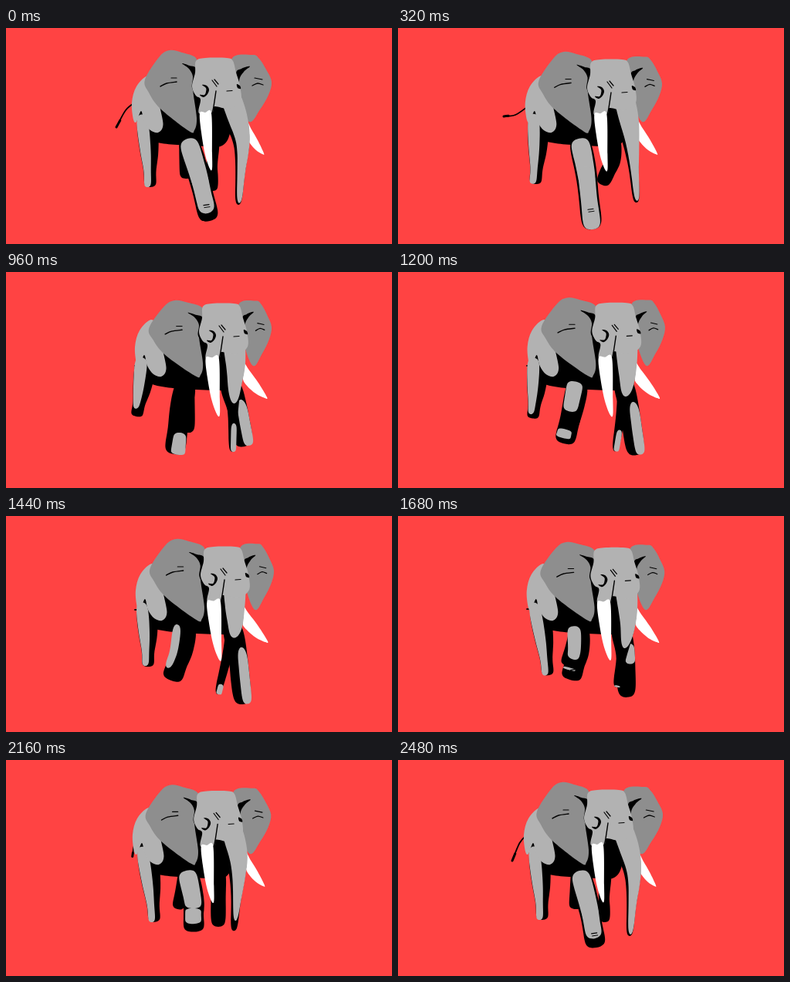
Write an HTML page with a canvas that moves like this. It is 500 px wide and 281 px high and loops after 2.56 s.

```html
<!DOCTYPE html>
<html lang="en">
<head>
<meta charset="utf-8">
<title>Walking elephant</title>
<style>
html, body { margin: 0; width: 100%; height: 100%; overflow: hidden; background: #ff4343; }
canvas { display: block; width: 500px; height: 281px; }
</style>
</head>
<body>
<canvas id="stage" width="500" height="281"></canvas>
<script>
const ctx = document.getElementById('stage').getContext('2d');
const LOOP = 2560, STEP = 80;
const TIMES = [0, 320, 640, 960, 1440, 1840, 2480];
const RED = '#ff4343', LIGHT = '#b2b2b2', EAR = '#8e8e8e', BLACK = '#000', WHITE = '#fff';

const nums = s => s.split(' ').map(Number);
const track = s => s.split(', ').map(nums);
const mix = (a, b, u) => a + (b - a) * u;

// One row per pose.
const HEAD = track('0 0 29 344, 4 2 31 342, 7 4 36 341, 9 2 37 344, 11 1 30 347, 6 3 36 344, 0 0 29 343'); // shift, left ear top, right ear edge
const TRUNK = track('307 302 230 3.9 4, 304 310 227 3.9 4, 298 307 230 3.9 4, 296 294 234 2.5 3.1, 296 275 232 2.2 3.6, 298 290 218 2.95 4, 306 301 229 3.9 4'); // bend, tip, light ranges
const NEAR = track('249 190 264 251, 243 185 252 262, 232 185 232 249, 226 180 218 237, 228 175 214 214, 238 175 232 213, 247 190 257 244'); // knee, foot
const NEAR_LIGHT = track('1.6 .9 2.6 0, 1.6 .9 3 0, 1.35 1.4 3 0, .1 2 3 .3, 2.3 2.3 2.3 -.75, 1.3 2.1 2.4 -.15, 1.6 .9 2.5 0');
const FAR = track('267 175 268 212 .55, 279 170 264 204 .75, 293 170 290 214 1.05, 299 175 309 227 1, 300 180 307 245 .95, 288 172 288 228 .95, 267 175 268 211 .55'); // knee, foot, girth
const FAR_LIGHT = track('.8, .8, 2.5, 3, 3, .8, .8');
const HIND = track('187 207 3, 178 203 3, 171 197 3, 169 188 2.3, 184 196 2.9, 198 212 3, 187 208 3'); // foot, light end
const BACK = track('233 196, 241 196, 234 205, 237 209, 216 196, 218 194, 229 194');
const TAIL = track('97 143 129 -6, 103 137 115 4, 130 154 139 2, 122 172 122 0, 122 172 122 0, 120 172 120 0, 97 148 131 -6'); // base y, tip, sag

// Periodic monotone cubic interpolation.
function at(keys, t) {
  const n = TIMES.length, wrap = k => (k + n) % n;
  let i = n - 1;
  while (TIMES[i] > t) i--;
  const span = k => (TIMES[wrap(k + 1)] - TIMES[wrap(k)] + LOOP) % LOOP;
  const h = span(i), u = (t - TIMES[i]) / h;
  return keys[i].map((a, j) => {
    const rate = k => (keys[wrap(k + 1)][j] - keys[wrap(k)][j]) / span(k);
    const slope = k => {
      const p = rate(k - 1), q = rate(k);
      return p * q > 0 ? 2 * p * q / (p + q) : 0;
    };
    return mix(a, keys[wrap(i + 1)][j], u * u * (3 - 2 * u))
      + h * u * (1 - u) * ((1 - u) * slope(i) - u * slope(i + 1));
  });
}

// Smooth curve through a flat list of x, y.
function trace(p, closed) {
  const n = p.length / 2;
  const pt = k => {
    k = closed ? (k + n) % n : Math.max(0, Math.min(n - 1, k));
    return [p[2 * k], p[2 * k + 1]];
  };
  ctx.beginPath();
  ctx.moveTo(p[0], p[1]);
  for (let k = 0; k < (closed ? n : n - 1); k++) {
    const [a, b, c, d] = [pt(k - 1), pt(k), pt(k + 1), pt(k + 2)];
    ctx.bezierCurveTo(b[0] + (c[0] - a[0]) / 6, b[1] + (c[1] - a[1]) / 6,
      c[0] - (d[0] - b[0]) / 6, c[1] - (d[1] - b[1]) / 6, c[0], c[1]);
  }
}

function fill(p, color) {
  trace(p, true);
  ctx.fillStyle = color;
  ctx.fill();
}

function line(p, width) {
  trace(p, false);
  ctx.lineWidth = width;
  ctx.stroke();
}

// Draws shapes and lines made for box a stretched into box b.
function fit(a, b, shapes) {
  const sx = (b[2] - b[0]) / (a[2] - a[0]), sy = (b[3] - b[1]) / (a[3] - a[1]);
  ctx.save();
  ctx.transform(sx, 0, 0, sy, b[0] - a[0] * sx, b[1] - a[1] * sy);
  for (const [p, style] of shapes) (typeof style === 'number' ? line : fill)(p, style);
  ctx.restore();
}

const shapes = (...list) => list.map(([s, style]) => [nums(s), style]);

// Point and half width along a chain of [x, y, w] joints.
function along(chain, u) {
  const last = chain.length - 1;
  const i = Math.min(Math.floor(u), last - 1), f = u - i;
  const [a, b, c, d] = [i - 1, i, i + 1, i + 2].map(k => chain[Math.max(0, Math.min(last, k))]);
  return b.map((v, k) => v + f / 2 * (c[k] - a[k]
    + f * (2 * a[k] - 5 * v + 4 * c[k] - d[k] + f * (3 * (v - c[k]) + d[k] - a[k]))));
}

// Rounded limb over part of a chain; shift moves it sideways by its own width.
function limb(chain, color, from = 0, to = chain.length - 1, shift = 0, scale = 1) {
  if (to - from < .05) return;
  const N = 14, left = [], right = [];
  for (let k = 0; k <= N; k++) {
    const v = (1 - Math.cos(Math.PI * k / N)) / 2, u = mix(from, to, v);
    const [x, y, w] = along(chain, u);
    const a = along(chain, Math.max(0, u - .05));
    const b = along(chain, Math.min(chain.length - 1, u + .05));
    const dx = b[0] - a[0], dy = b[1] - a[1], len = Math.hypot(dx, dy) || 1;
    const girth = w * scale * Math.sqrt(1 - (2 * v - 1) ** 6);
    const side = r => [x + dy / len * r, y - dx / len * r];
    right.push(side(w * shift + girth));
    left.unshift(side(w * shift - girth));
  }
  fill([...right, ...left.slice(1, -1)].flat(), color);
}

// Hip, knee, ankle, foot.
function leg(hip, knee, foot, widths, bend = .5) {
  const ankle = [mix(knee[0], foot[0], bend), mix(knee[1], foot[1], bend)];
  return [hip, knee, ankle, foot].map((p, i) => [p[0], p[1], widths[i]]);
}

const BODY = shapes(['185 68 171 95 169 118 178 142 196 150 222 153 262 155 280 154 290 138 292 100 270 60', BLACK]);
const RUMP = shapes(['184 62 169 76 163 97 165 119 169 122 175 108 179 122 187 133 197 136 203 129 202 115 192 75', LIGHT]);
const LEFT_EAR = shapes(
  ['180 67 199 37 212 29 228 32 246 39 248 56 242 76 247 117 244 133 237 134 200 105 185 84', EAR],
  ['228 46 238 49 247 54 247 80 249 91 241 78 242 63 237 53', BLACK],
  ['200 76 208 72 221 70', 1.4], ['214 65 221 65', 1.1]);
const RIGHT_EAR = shapes(
  ['292 41 319 35 328 40 337 54 344 70 340 87 329 106 315 122 300 90', EAR],
  ['316 50 305 53 298 60 304 94 302 69 308 57', BLACK],
  ['319 75 326 72 333 74', 1.3], ['322 65 332 67', 1.2]);
const FACE = shapes(
  ['246 43 258 39 286 39 294 43 298 58 303 75 304 95 290 105 270 102 267 110 250 111 252 93 246 88 241 76 245 58', LIGHT],
  ['254 74 260 75 263 80 261 86 256 90 251 87 257 87 259 83 259 78', BLACK],
  ['272 82 269 102 267 111', 1.4], ['267 68 273 76', 1.2], ['270 67 275 73', 1.2],
  ['286 82 293 81.5', 1.2], ['299 73 303 75 304 79 300 78', BLACK]);
const LEFT_TUSK = shapes(['251 111 258 110 266 111 267 163 267 183 264 183 258 165 253 136', WHITE]);
const RIGHT_TUSK = shapes(['312 122 318 132 326 146 334 163 332 164 324 159 316 150 312 141', WHITE]);

function drawTail(t) {
  const [y, tx, ty, sag] = at(TAIL, t);
  const mid = [mix(167, tx, .5), mix(y, ty, .5) + sag];
  line([167, y, ...mid, tx, ty], 1.8);
  line([mix(mid[0], tx, .6), mix(mid[1], ty, .6), tx, ty], 3);
}

function drawHind(t, dx) {
  const [bx, by] = at(BACK, t);
  limb([[234, 140, 10], [mix(234, bx, .5), 172, 9], [bx, by, 8]], BLACK);
  const [x, y, end] = at(HIND, t);
  const hip = [182, 112];
  const chain = leg(hip, [mix(184, x, .5), mix(112, y, .5)], [x, y], [16, 12, 8, 9], .6);
  limb(chain, BLACK);
  fit([168, 60, 292, 155], [168 + dx * .4, 60, 292 + dx * 1.4, 154], BODY);
  limb(chain, LIGHT, 0, end, -.4, .57);
  fit([0, 0, 1, 1], [dx * .45, 0, 1 + dx * .45, 1], RUMP);
}

function drawFront(t, dx) {
  const [kx, ky, fx, fy, girth] = at(FAR, t);
  const far = leg([270 + 2 * dx, 140], [kx, ky], [fx, fy], [16, 13, 13, 13].map(w => w * girth));
  limb(far, BLACK);
  limb(far, LIGHT, .8, at(FAR_LIGHT, t)[0], .48, .52);

  const [nx, ny, mx, my] = at(NEAR, t);
  const near = leg([234, 141], [nx, ny], [mx, my], [16, 14, 13, 15]);
  const [thigh, from, to, shift] = at(NEAR_LIGHT, t);
  const scale = .82 - Math.abs(shift) * .6;
  limb(near, BLACK);
  limb(near, LIGHT, .1, thigh, shift, scale);
  limb(near, LIGHT, from, to, shift, scale);
  if (thigh > 1.5) {
    const [x, y] = along(near, 2.3);
    line([x - 3, y, x + 4, y - 1], 1.2);
    line([x - 2, y + 3, x + 5, y + 2], 1);
  }
}

function drawHead(t, [dx, dy, earTop, earEdge]) {
  fit([292, 35, 344, 122], [292 + dx, 35 + 1.2 * dy, earEdge, 122], RIGHT_EAR);
  fit([312, 122, 334, 164], [312 - .6 * dx, 122 - .6 * dx, 334 + .45 * dx, 164], RIGHT_TUSK);
  fit([180, 29, 247, 135], [180 + .6 * dx, earTop, 247 + .9 * dx, 135 + dx * .1], LEFT_EAR);

  const [bend, tx, ty, end, tipFrom] = at(TRUNK, t);
  const trunk = [[287 + dx * .8, 78, 16], [301 - .4 * dx, 120, 12.5], [bend, 151, 8.5],
    [mix(bend, tx, .5), mix(151, ty, .5), 5], [tx, ty, 4.5]];
  limb(trunk, BLACK, .3, 4, -.25, 1.2);
  limb(trunk, LIGHT, 0, end);
  limb(trunk, LIGHT, tipFrom, 4, .1, .8);

  fit([0, 0, 1, 1], [dx, dy, dx + 1, dy + 1], FACE);
  fit([251, 110, 267, 184], [251 + .85 * dx, 110 + dy * .6, 267 + 1.1 * dx, 184 + dx * .3], LEFT_TUSK);
}

ctx.lineCap = ctx.lineJoin = 'round';
const start = performance.now();

function draw(now) {
  const t = Math.floor(Math.max(0, now - start) % LOOP / STEP) * STEP;
  const pose = at(HEAD, t);
  ctx.fillStyle = RED;
  ctx.fillRect(0, 0, 500, 281);
  drawTail(t);
  drawHind(t, pose[0]);
  drawFront(t, pose[0]);
  drawHead(t, pose);
  requestAnimationFrame(draw);
}
draw(start);
</script>
</body>
</html>
```
